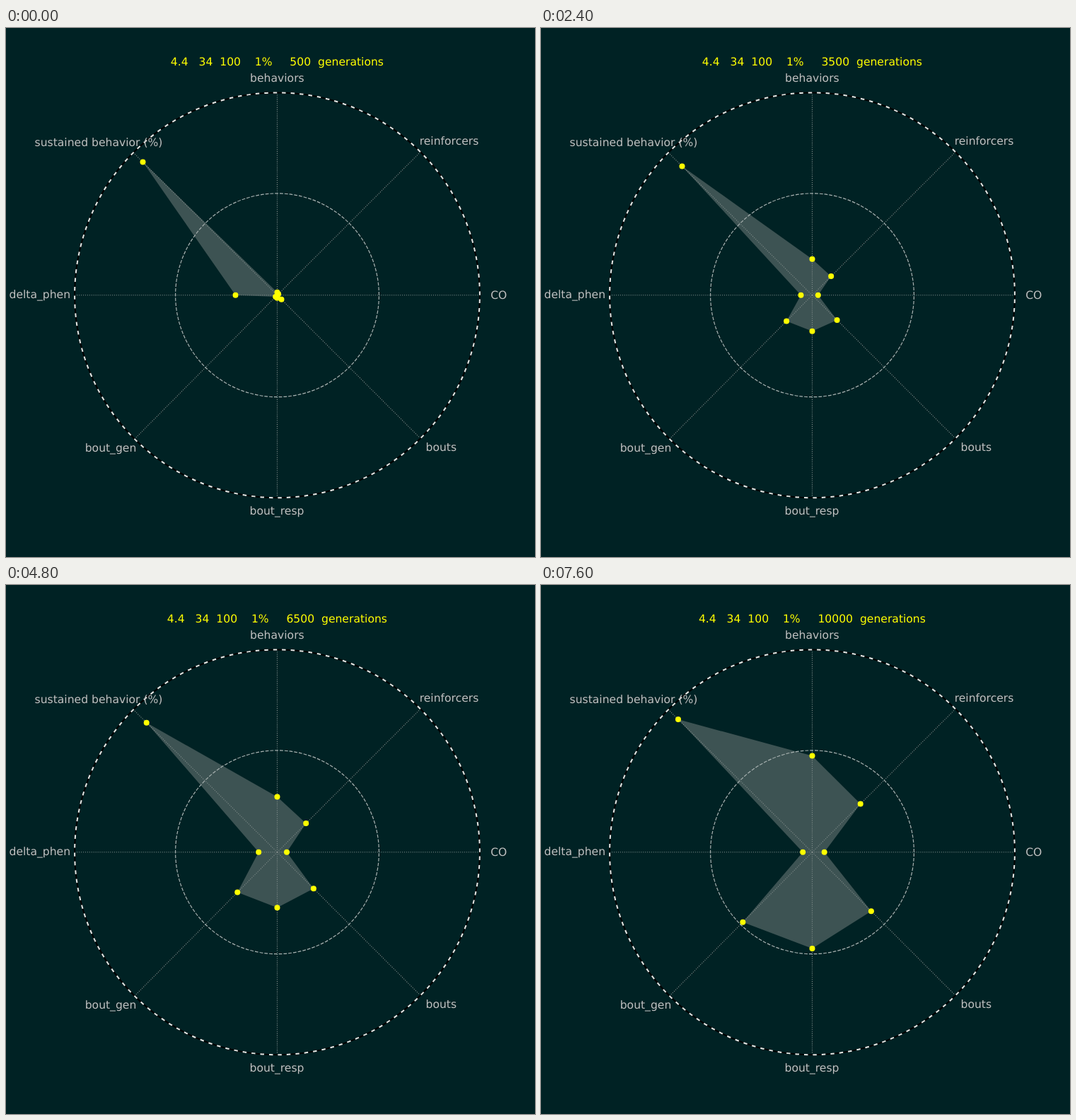
Recreate the animation shown at these times as an HTML page. Size 748 by 748 pixels, loop 8000 ms.

```html
<!DOCTYPE html>
<html lang="en">
<head>
<meta charset="utf-8">
<title>Radar chart</title>
<style>
  html, body { margin: 0; width: 100%; height: 100%; overflow: hidden; background: #002224; }
  svg { display: block; width: 100vw; height: 100vh; }
  text { font: 15.6px "DejaVu Sans", sans-serif; text-anchor: middle; white-space: pre; text-rendering: geometricPrecision; }
</style>
</head>
<body>
<svg id="stage" viewBox="0 0 748 748"></svg>
<script>
const CX = 383.5, CY = 377.8, RADIUS = 286.4, STEP = 400, STEPS = 20;
const svg = document.getElementById('stage');

function add(tag, attrs, content) {
  const el = document.createElementNS('http://www.w3.org/2000/svg', tag);
  for (const name in attrs) el.setAttribute(name, attrs[name]);
  if (content) el.textContent = content;
  return svg.appendChild(el);
}

// Straight lines between a few key steps
const keys = [0, 2, 4, 6, 8, 12, 16, 19];
function series(...values) {
  return step => {
    const k = Math.max(0, keys.findIndex(key => key >= step) - 1);
    const u = (step - keys[k]) / (keys[k + 1] - keys[k]);
    return values[k] + (values[k + 1] - values[k]) * u;
  };
}

const responses = series(4, 29.3, 36.6, 51, 65, 78.4, 105, 136.2);
const bouts = series(6, 18, 28, 35.1, 42.4, 51.4, 70.3, 83.4);
const sustained = series(190, 197.4, 174, 184, 189.8, 184.8, 184, 189.5);
const delta = series(59, 1, 8, 16, 17.2, 26.3, 8.5, 13.3);
const co = series(0.5, 7.5, 8, 8.3, 13.5, 13.5, 17.2, 17.2);

// Counterclockwise from the right: label, its place, direction, distance in pixels
const axes = [
  { label: 'CO', x: 696.8, y: 383.4, dx: 1, dy: 0, value: co },
  { label: 'reinforcers', x: 626.5, y: 165.4, dx: 1, dy: -1, value: s => 0.86 * bouts(s) - 3.5 },
  { label: 'behaviors', x: 383.4, y: 76.4, dx: 0, dy: -1, value: responses },
  { label: 'sustained behavior (%)', x: 131, y: 166.8, dx: -1, dy: -0.991, value: sustained },
  { label: 'delta_phen', x: 47.8, y: 381.8, dx: -1, dy: 0, value: delta },
  { label: 'bout_gen', x: 148, y: 599.3, dx: -1, dy: 1.008, value: s => 0.725 * responses(s) - 0.6 },
  { label: 'bout_resp', x: 383, y: 688.3, dx: 0, dy: 1, value: responses },
  { label: 'bouts', x: 615.3, y: 598.2, dx: 1, dy: 1, value: bouts }
];

const area = add('polygon', { fill: '#3d5353' });

for (const { dx, dy } of axes) {
  const k = RADIUS / Math.hypot(dx, dy);
  add('line', {
    x1: CX, y1: CY, x2: CX + dx * k, y2: CY + dy * k,
    stroke: '#808c8a', 'stroke-width': 1.11, 'stroke-dasharray': '1.11 1.83'
  });
}

function ring(r, stroke, width, dash) {
  add('circle', {
    cx: CX, cy: CY, r, fill: 'none', stroke,
    'stroke-width': width, 'stroke-dasharray': dash,
    transform: `matrix(1 0 0 -1 0 ${2 * CY})`
  });
}
ring(RADIUS / 2 + 0.7, '#a9b2b1', 1.2, '4.8 2');
ring(RADIUS, '#000', 2, 'none');
ring(RADIUS, '#e6e8e6', 2, '5.5 7');

const dots = axes.map(() => add('circle', { r: 4, fill: '#ff0' }));
for (const { label, x, y } of axes) add('text', { x, y, fill: '#c0c0c0' }, label);
const title = add('text', { x: 383.4, y: 53.4, fill: '#ff0' });

function draw(time) {
  const step = Math.floor(time / STEP) % STEPS;
  const points = axes.map(({ dx, dy, value }) => {
    const d = value(step);
    return [CX + dx * d, CY + dy * d];
  });
  area.setAttribute('points', points.join(' '));
  points.forEach(([x, y], i) => {
    dots[i].setAttribute('cx', x);
    dots[i].setAttribute('cy', y);
  });
  title.textContent = `4.4   34  100    1%     ${(step + 1) * 500}  generations`;
}

function loop() {
  draw(performance.now());
  requestAnimationFrame(loop);
}
loop();
</script>
</body>
</html>
```
